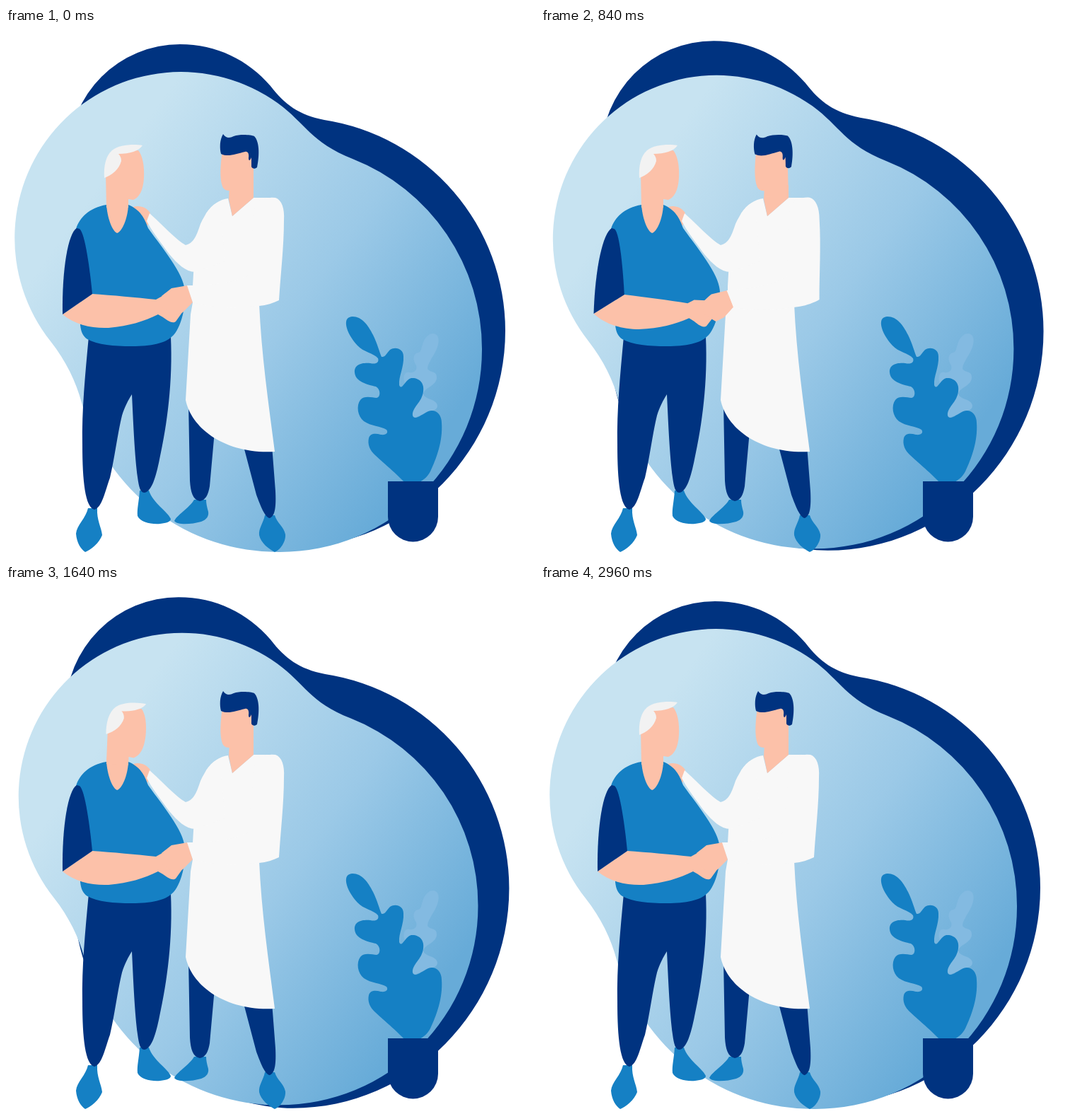
An HTML page with a canvas for the animation above (3000 ms loop, 748 px wide and 748 px high).

```html
<!DOCTYPE html>
<html lang="en">
<head>
<meta charset="utf-8">
<title>Care visit</title>
<style>
html, body { margin: 0; width: 100%; height: 100%; overflow: hidden; background: #fff; }
canvas { display: block; width: 748px; height: 748px; }
</style>
</head>
<body>
<canvas id="stage" width="748" height="748"></canvas>
<script>
const ctx = document.getElementById('stage').getContext('2d');
const LOOP = 3000;
const NAVY = '#003380', BLUE = '#1580c4', SKIN = '#fcc1a9', COAT = '#f8f8f8', HAIR = '#f2f2f2';

const sky = ctx.createLinearGradient(130, 225, 615, 575);
sky.addColorStop(0, '#c7e3f1');
sky.addColorStop(0.55, '#9bc9e7');
sky.addColorStop(1, '#67abd8');

const shapes = {
  darkBlob: `M89 180 A157 157 0 0 1 246 23 C298 23 342 45 374 82 C394 108 414 123 450 130
    A302 302 0 0 1 706 428 C706 597 570 734 405 734 C325 734 225 690 165 610
    C138 575 121 550 114 528 C109 513 107 500 103 486 C90 445 89 300 89 180Z`,
  lightBlob: `M63 443 A235 235 0 0 1 384 106 C425 136 430 161 490 185
    A289 289 0 0 1 673 455 A286 286 0 0 1 387 741 A288 288 0 0 1 107 530
    C99 500 85 471 63 443Z`,
  backLeaf: `M604 432 C614 433 613 446 608 456 C604 465 596 474 596 482 C600 488 609 484 609 494
    C609 506 592 508 590 517 C592 526 609 524 610 534 C610 541 602 541 596 544 L575 552
    L566 505 C560 498 562 485 570 487 C577 488 582 484 580 477 C575 470 575 460 583 459
    C588 458 587 450 591 442 C595 435 599 432 604 432Z`,
  leaf: `M490 408 C503 408 512 420 519 434 C525 446 528 458 531 465 C536 466 538 460 543 455
    C551 450 562 454 562 464 C563 480 555 492 556 505 C560 514 564 497 573 495
    C584 494 592 502 590 514 C588 530 574 536 575 548 C578 556 588 546 597 542
    C607 538 616 546 616 558 C618 585 608 610 600 627 C596 635 590 639 585 642 L563 642
    C550 628 530 612 522 604 C514 597 511 588 513 580 C515 573 522 573 530 575
    C538 576 541 572 538 568 C530 563 516 563 506 556 C497 549 495 534 501 526
    C507 519 518 523 524 523 C530 522 530 511 523 507 C510 504 494 500 493 487
    C492 475 505 473 515 474 C523 476 528 473 526 467 C520 460 505 458 497 449
    C485 436 478 420 482 412 C484 409 487 408 490 408Z`,
  pot: 'M540 641 H611 V691 A35.5 35.5 0 0 1 540 691Z',

  docShoes: `M266 667 C260 678 240 690 238 697 C242 703 262 702 276 698 C284 695 287 690 286 684
    C284 677 283 672 283 667Z
    M366 689 C364 700 357 707 358 717 C360 728 372 737 380 741 C388 738 396 726 395 716
    C393 705 383 700 380 689Z`,
  docLegs: `M258 530 L260 640 C261 656 264 667 274 669 C282 668 286 660 288 648 L295 570Z
    M335 588 L376 590 L381 655 C382 675 381 690 373 693 C366 692 360 676 354 660Z`,
  coat: `M314 241 C303 242 291 250 283 262 L266 330 L264 365 L264 388 L261 405 L254 526
    C262 566 310 603 380 599 C371 530 361 460 358 390 L372 380 L381 240 H350 L320 266Z`,
  restArm: `M302 245 C290 250 282 262 275 277 C270 292 266 304 254 307 C240 299 220 277 203 262
    L199 273 C206 287 218 302 231 320 C242 333 254 345 268 345 L310 330Z`,
  restHand: 'M204 262 C201 256 194 252 186 252 C178 252 175 256 177 264 L196 285 L202 276Z',
  foreArm: `M352 250 Q362 238 381 240 C390 243 394 255 393 272 C393 310 388 350 386 385
    C378 389 368 392 358 393 C325 396 292 397 264 388 L256 364 C285 364 318 362 342 350Z`,
  docHand: 'M257 364 L234 368 C230 371 225 375 220 379 L222 396 L238 407 L250 402 L264 388Z',
  docNeck: 'M316 224 L315 242 L320 266 L350 240 V222Z',
  docFace: `M306 172 C303 195 302 213 306 224 C308 229 312 230 317 230 L318 238 H350 V190
    C350 180 345 170 330 170Z`,
  docHair: `M307 150 C311 156 316 156 322 153 C331 150 346 151 351 153 C358 160 359 178 355 197
    C352 200 348 199 347 196 V183 C345 188 343 188 343 184 C344 178 342 174 338 175
    C325 178 314 183 304 178 C302 170 302 158 307 150Z`,

  shoes: `M116 679 C113 693 100 703 99 715 C100 728 106 737 112 741 C120 738 132 728 136 717
    C135 706 128 696 129 679Z
    M189 654 C188 670 185 680 186 690 C190 699 205 702 218 701 C227 700 233 698 233 694
    C228 683 208 672 202 654Z`,
  legs: `M117 436 C112 490 107 540 108 590 C108 640 112 678 125 681 C136 678 140 655 147 636
    C153 612 158 572 164 548 C168 535 173 526 178 518 C180 560 182 605 186 635
    C188 650 190 657 196 657 C206 655 212 635 217 610 C228 560 236 500 233 436Z`,
  shirt: `M142 250 C118 254 104 268 99 284 L106 375 L105 420 C106 430 109 436 115 440
    C130 448 152 450 178 450 C205 450 225 446 235 436 C247 427 257 388 252 366
    C248 342 214 302 201 283 C196 269 190 257 173 250Z`,
  sleeve: 'M100 283 C88 290 79 340 80 405 L122 376 C119 345 112 290 104 284Z',
  arm: `M80 405 L122 376 C150 378 185 381 212 384 L221 379 L243 379 L250 401 L240 415
    C235 419 226 412 222 409 L215 405 C195 415 175 421 145 424 C122 425 98 420 80 405Z`,
  neck: 'M142 249 C143 268 150 287 157 290 C164 288 172 270 173 250 L172 242 H143Z',
  face: `M155 176 L187 173 C193 180 196 195 195 212 C194 230 188 240 180 243 L173 242
    V254 H142 L141 205Z`,
  hair: `M193 166 C180 164 160 165 150 173 C141 181 138 195 139 212 C150 208 160 200 163 188
    C163 183 161 180 159 178 C175 178 188 174 193 166Z`
};
for (const k in shapes) shapes[k] = new Path2D(shapes[k]);

function fill(color, ...names) {
  ctx.fillStyle = color;
  names.forEach(n => ctx.fill(shapes[n]));
}

// Run draw() turned by angle and scaled about (x, y).
function about(x, y, angle, scale, draw) {
  ctx.save();
  ctx.translate(x, y);
  ctx.rotate(angle);
  ctx.scale(scale, scale);
  ctx.translate(-x, -y);
  draw();
  ctx.restore();
}

// Smooth rise and fall between two times.
function pulse(t, from, to) {
  return t > from && t < to ? Math.sin(Math.PI * (t - from) / (to - from)) ** 2 : 0;
}

function breath(t) {
  const peak = 1400, end = 2960;
  if (t < peak) return Math.sin(Math.PI / 2 * t / peak);
  return t < end ? Math.cos(Math.PI / 2 * (t - peak) / (end - peak)) : 0;
}

function draw(t) {
  const b = breath(t);
  const shake = pulse(t, 0, 1240);
  const nod = pulse(t, 1200, 1960);
  const pat = pulse(t, 1680, 2360);

  ctx.fillStyle = '#fff';
  ctx.fillRect(0, 0, 748, 748);
  about(370, 379, 0, 1 + 0.0167 * b, () => fill(NAVY, 'darkBlob'));
  about(342, 402, 0, 1 - 0.0172 * b, () => fill(sky, 'lightBlob'));

  fill('#83bae1', 'backLeaf');
  fill(BLUE, 'leaf');
  fill(NAVY, 'pot');

  fill(BLUE, 'docShoes');
  fill(NAVY, 'docLegs');
  fill(COAT, 'coat');
  about(298, 268, 0.09 * pat, 1, () => {
    fill(SKIN, 'restHand');
    fill(COAT, 'restArm');
  });
  fill(SKIN, 'docNeck');
  about(328, 240, -0.034 * shake, 1, () => {
    fill(SKIN, 'docFace');
    fill(NAVY, 'docHair');
  });

  fill(BLUE, 'shoes');
  fill(NAVY, 'legs');
  fill(BLUE, 'shirt');
  fill(SKIN, 'neck');
  about(157, 252, 0.064 * nod, 1, () => {
    fill(SKIN, 'face');
    fill(HAIR, 'hair');
  });

  about(98, 285, 0.064 * shake, 1, () => {
    fill(SKIN, 'arm');
    fill(NAVY, 'sleeve');
  });
  about(375, 260, -0.085 * shake, 1, () => {
    fill(SKIN, 'docHand');
    fill(COAT, 'foreArm');
  });
}

const start = performance.now();
function tick() {
  draw((performance.now() - start) % LOOP);
  requestAnimationFrame(tick);
}
tick();
</script>
</body>
</html>
```
